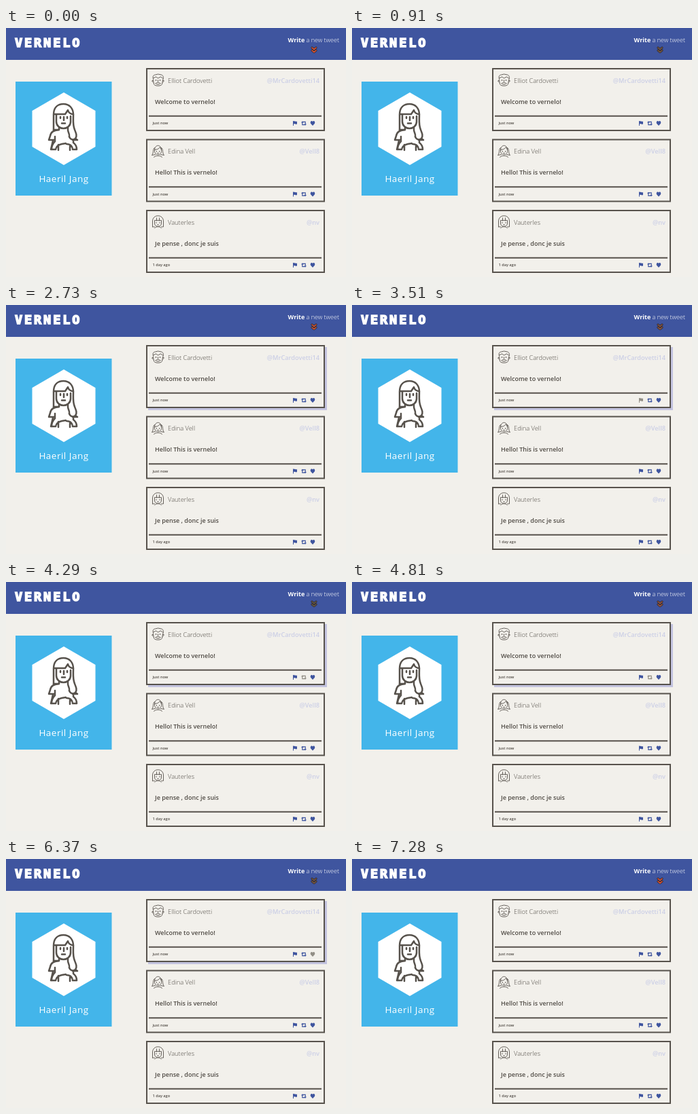
Write an HTML page that moves like this. It is 500 by 367 pixels and loops after 7410 ms.

```html
<!DOCTYPE html>
<html lang="en">
<head>
<meta charset="utf-8">
<title>Feed</title>
<style>
  html, body { margin: 0; width: 100%; height: 100%; overflow: hidden; background: #f2f0eb; }
  svg { display: block; width: 500px; height: 367px; }
  text { font-family: "Open Sans", "Noto Sans", sans-serif; font-size: 9px; fill: #504b45; }
  .logo { font: bold 18.5px "DejaVu Sans Mono", monospace; letter-spacing: 2.9px;
          fill: #fff; stroke: #fff; stroke-width: 1.6; }
  .nav { fill: #fff; font-weight: 300; text-anchor: end; }
  .owner { font-size: 13.5px; letter-spacing: .5px; fill: #fff; text-anchor: middle; }
  .name { font-size: 9.3px; font-weight: 300; }
  .handle { font-size: 9.2px; font-weight: 600; fill: #cccfe6; text-anchor: end; }
  .message { font-weight: 600; }
  .time { font-size: 5.6px; font-weight: 600; }
  .line { fill: none; stroke: #57524c; stroke-linecap: round; stroke-linejoin: round; }
  .icon { fill: #3f559f; }
</style>
</head>
<body>
<svg viewBox="0 0 500 367">
  <rect width="500" height="367" fill="#f2f0eb"/>
  <rect width="500" height="47" fill="#3f559f"/>
  <text class="logo" x="13" y="28.3">VERNELO</text>
  <text class="nav" x="490" y="21"><tspan font-weight="700">Write</tspan> a new tweet</text>
  <g fill="none" stroke-linejoin="round" stroke-linecap="round">
    <path d="M450 29l3 2.6 3-2.6M450 33l3 2.6 3-2.6" stroke="#342d36" stroke-width="3.2"/>
    <path id="chevron" d="M450 29l3 2.6 3-2.6M450 33l3 2.6 3-2.6" stroke-width="1.6"/>
  </g>

  <rect x="14" y="79" width="141.5" height="168" fill="#43b5ea"/>
  <path d="M85 95l46.5 27v53L85 202l-46.5-27v-53z" fill="#fff"/>
  <g class="line" stroke-width="2.5">
    <path d="M70 151V128C70 117 76 112 84.500 112S99 118 99 128c0 9-1 15 2 22 2 5 4 9 1 13-3 3-8 1-9-3"/>
    <path d="M71 127h16l4-6c1 4 4 6 8 6M74 128v10c0 6 5 10 10.500 10S95 144 95 138v-8M70 150h8v-4M91 146v4c0 4 3 6 2 10"/>
    <path d="M80 131v2M90 131v2M85 131v5M82 140.500h5"/>
    <path d="M78 150c-8 1-12 3-13 9l-2 6h9M69 166l-3 13M72 160v7c-4 4-5 8-5 12h6c1-5 4-7 9-8l6-1M77 180v-8M102 163l3 2h-7M99 166v3c4 3 5 6 5 10h-6c0-4-3-8-9-8M94 180v-6"/>
  </g>
  <text class="owner" x="85" y="227">Haeril Jang</text>

  <rect id="shadow" x="206" y="59" width="263" height="93" fill="#c3c3df"/>
  <g id="feed"></g>
</svg>
<script>
const LOOP = 7410;
const BLUE = [63, 85, 159], GREY = [146, 142, 134];
const RED = [226, 82, 46], DARK = [100, 88, 64];

const faces = [
  'M-7-2C-9-8-4-8-4-8L0-9 5-8C9-7 8-2 7 0L6 6C4 9-4 9-6 6L-7 0zM-7-3L-3-5 0-3 4-5 7-3M-4 0h2M2 0h2M0 0v2M-4 5L0 3 4 5M-2 6h4M-7 0L-9 1-7 3M7 0L9 1 7 3',
  'M-5 0C-6-11 6-11 5 0 5 7-5 7-5 0M-5-2C-1-2 2-4 3-6L5-2M-5-5C-8-4-6 3-9 6L-4 5M5-5C8-4 6 3 9 6L4 5M-2 0v1M2 0v1M-1 3h2M-6 9C-5 6 5 6 6 9',
  'M-8 7V-1C-8-12 8-12 8-1V7H5M-8 7h3M-5-2v4C-5 8 5 8 5 2V-2zM-2-2V-6M2-2V-6M-3 1h1M2 1h1M-1 4h2M-5 9C-3 6 3 6 5 9'
];
const icons = [
  'M422 137h1v.6c2-1 3 1 5 0v4c-2 1-3-1-5 0v2.400h-1z',
  'M434 139.500l1.800-2.200 1.800 2.200h-1.200v2.500h3l1 1.200h-5.200v-3.700zM442 141.500l-1.800 2.200-1.800-2.200h1.200V139h-3l-1-1.200h5.200v3.700z',
  'M451 144l-2.800-3C446.500 138.500 449.500 135.500 451 138c1.500-2.500 4.500.5 2.800 3z'
];
const posts = [
  ['Elliot Cardovetti', '@MrCardovetti14', 'Welcome to vernelo!', 'just now'],
  ['Edina Vell', '@Vell8', 'Hello! This is vernelo!', 'just now'],
  ['Vauterles', '@nv', 'Je pense , donc je suis', '1 day ago']
];

const card = ([name, handle, message, time], i) => `
  <g transform="translate(0 ${i * 104.5})">
    <rect x="207" y="60" width="261" height="91" fill="#f2f0eb" stroke="#57524c" stroke-width="2"/>
    <path class="line" stroke-width=".9" d="${faces[i]}" transform="translate(223.500 77)"/>
    <text class="name" x="238" y="80.500">${name}</text>
    <text class="handle" x="461" y="80.500">${handle}</text>
    <text class="message" x="219" y="111.500">${message}</text>
    <path d="M210 129.800h254" stroke="#57524c" stroke-width="2"/>
    <text class="time" x="215.500" y="142">${time}</text>
    ${icons.map(d => `<path class="icon" d="${d}"/>`).join('')}
  </g>`;

const $ = id => document.getElementById(id);
$('feed').innerHTML = posts.map(card).join('');
const hoverIcons = [...document.querySelectorAll('.icon')].slice(0, 3);
const hoverTimes = [[2800, 3770], [3980, 5200], [5330, 6450]];

const ramp = (t, start) => {
  const p = Math.min(1, Math.max(0, (t - start) / 300));
  return p * p * (3 - 2 * p);
};
const hover = (t, [start, end]) => ramp(t, start) - ramp(t, end);
const mix = (a, b, p) => `rgb(${a.map((v, i) => Math.round(v + (b[i] - v) * p))})`;

function draw() {
  const t = performance.now() % LOOP;
  const lift = 3 * hover(t, [1430, 6760]);
  $('shadow').setAttribute('transform', `translate(${lift} ${lift})`);
  hoverIcons.forEach((icon, i) => icon.style.fill = mix(BLUE, GREY, hover(t, hoverTimes[i])));
  $('chevron').style.stroke = mix(DARK, RED, (1 + Math.cos(t / 662 * 2 * Math.PI)) / 2);
  requestAnimationFrame(draw);
}
draw();
</script>
</body>
</html>
```
